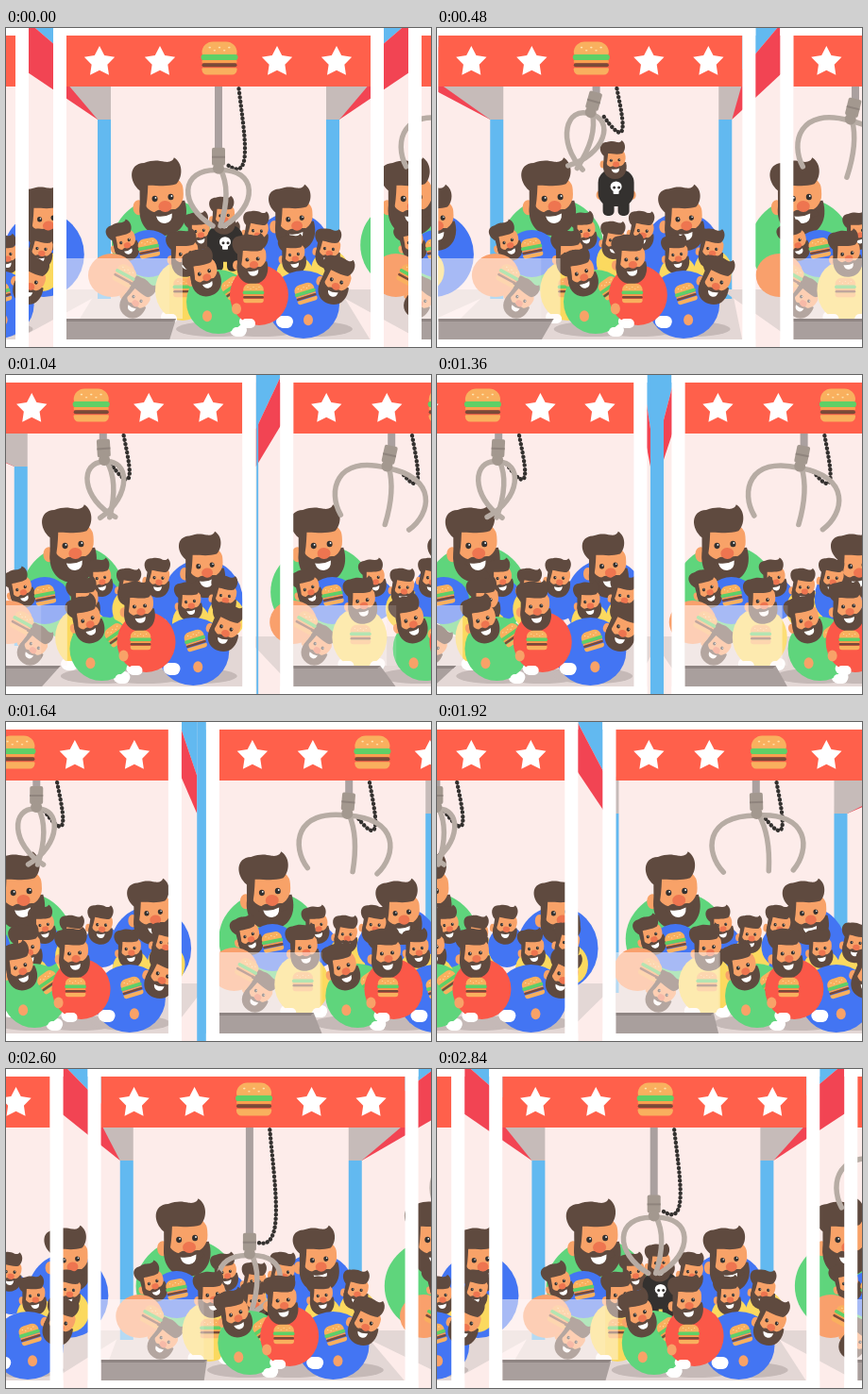
These frames come from a looping animation (450x338 px, 2.88 s). An HTML page with a canvas:

```html
<!DOCTYPE html>
<html lang="en">
<head>
<meta charset="utf-8">
<title>Claw machines</title>
<style>
html, body { margin: 0; width: 100%; height: 100%; overflow: hidden; background: #fdecea; }
canvas { display: block; width: 450px; height: 338px; }
</style>
</head>
<body>
<canvas width="450" height="338"></canvas>
<script>
const ctx = document.querySelector('canvas').getContext('2d');
const LOOP = 2880, STEP = 40, PITCH = 376, MID = 225;
const C = {
  pink: '#fdecea', white: '#fff', banner: '#ff604b', red: '#fb5848', beam: '#f24453', sky: '#62b9f0',
  green: '#5fd57c', blue: '#4375f3', yellow: '#fbd95f', peach: '#f9a06c', black: '#34312f',
  skin: '#f8a268', nose: '#ee7550', hair: '#5f4a3f', steel: '#b7aca4', ceiling: '#c6bbb9',
  floor: '#e3d7d5', pit: '#a99f9d', bun: '#f9b05e'
};

// layer, depth, eye x, eye y, size, tilt, colour, body ellipse relative to the eyes, extras
const SMALL = [1, 23, 20, 22];
const CROWD = [
  ['back', .7, 166, 180, 1, -.05, 'green', [0, 50, 54, 50]],
  ['back', .7, 306, 202, .85, -.05, 'blue', [-3, 38, 43, 45]],
  ['mid', .77, 205, 215, .5, -.1, 'blue', SMALL],
  ['mid', .77, 236, 225, .5, .1, 'yellow', SMALL],
  ['mid', .77, 266, 215, .52, .12, 'blue', SMALL],
  ['mid', .81, 342, 234, .53, .15, 'yellow', SMALL],
  ['mid', .81, 305, 240, .52, -.05, 'yellow', SMALL],
  ['low', .81, 126, 226, .53, -.3, 'blue', [25, 13, 27, 25], { snack: [25, 7, -.2] }],
  ['low', .8, 139, 287, .55, .6, 'peach', [-27, -25, 25, 23], { snack: [-13, -25, .5] }],
  ['low', .78, 190, 239, .62, -.08, 'yellow', [-3, 39, 29, 32], { snack: [-2, 36, 0], shoes: [-17, 15] }],
  ['front', .91, 210, 259, .64, -.25, 'green', [15, 31, 34, 34], { snack: [30, 16, -.6], shoes: [36], hand: 3 }],
  ['front', .86, 350, 268, .64, .35, 'blue', [-35, 25, 38, 36], { snack: [-33, 13, -.3], hand: -30 }],
  ['front', .88, 261, 245, .66, -.03, 'red', [7, 38, 31, 32], { snack: [1, 36, 0], shoes: [-5, 34], hand: -17 }]
];

const shift = (c, depth) => (c - MID) * depth;

function key(t, frames) {
  if (t <= frames[0][0]) return frames[0][1];
  for (let i = 1; i < frames.length; i++) {
    const [t0, a] = frames[i - 1], [t1, b] = frames[i];
    if (t <= t1) return a + (b - a) * (t - t0) / (t1 - t0);
  }
  return frames[frames.length - 1][1];
}
function rect(x, y, w, h, color) {
  ctx.fillStyle = color;
  ctx.fillRect(x, y, w, h);
}
function poly(color, ...points) {
  ctx.fillStyle = color;
  ctx.beginPath();
  points.forEach(p => ctx.lineTo(p[0], p[1]));
  ctx.fill();
}
function oval(x, y, rx, ry, color) {
  ctx.fillStyle = color;
  ctx.beginPath();
  ctx.ellipse(x, y, rx, ry, 0, 0, Math.PI * 2);
  ctx.fill();
}
function box(x, y, w, h, r, color) {
  ctx.fillStyle = color;
  ctx.beginPath();
  ctx.roundRect(x, y, w, h, r);
  ctx.fill();
}
function path(d, color) {
  ctx.fillStyle = color;
  ctx.fill(new Path2D(d));
}
function at(x, y, angle, size, draw) {
  ctx.save();
  ctx.translate(x, y);
  ctx.rotate(angle);
  ctx.scale(size, size);
  draw();
  ctx.restore();
}
function within(x, w, draw) {
  ctx.save();
  ctx.beginPath();
  ctx.rect(x, 0, w, 338);
  ctx.clip();
  draw();
  ctx.restore();
}

function burger() {
  box(-18, -17, 36, 14, [12, 12, 3, 3], C.bun);
  for (let i = 0; i < 5; i++) oval(-10 + i * 5, -11 + (i % 2) * 3, 1.2, .8, '#fde3ae');
  box(-19, -4, 38, 6, 3, '#5fd066');
  box(-18, 2, 36, 3, 1, '#f9a04f');
  box(-18, 5, 36, 4, 2, '#7a4a38');
  box(-18, 10, 36, 7, [1, 1, 5, 5], C.bun);
}
function star(x, y) {
  const points = Array.from({ length: 10 }, (_, i) => {
    const r = i % 2 ? 8.8 : 17, a = i * Math.PI / 5 - Math.PI / 2;
    return [x + r * Math.cos(a), y + r * Math.sin(a)];
  });
  poly(C.white, ...points);
}
// The origin lies between the eyes.
function head() {
  oval(-26, 9, 6, 8, C.skin);
  path('M-24 4 L23 4 C28 24 18 40 0 40 C-19 40 -29 24 -24 4Z', C.hair);
  box(-20, -22, 42, 37, [10, 14, 18, 14], C.skin);
  path('M-25 14 L-24 -9 C-35 -19 -35 -38 -18 -38 C-8 -41 -3 -40 4 -38 C10 -37 13 -39 14 -42 C24 -35 22 -20 15 -14 C4 -11 -7 -14 -15 -14 C-16 -3 -17 6 -20 16Z', C.hair);
  path('M-13 20 C-10 11 -2 12 3 14 C9 11 17 12 18 19 C10 23 -4 24 -13 20Z', C.hair);
  for (const x of [-8.5, 8.5]) {
    oval(x, -x * .06, 3, 3.2, C.black);
    oval(x + 1, -x * .06 - 1, .9, .9, C.white);
  }
  oval(2, 9, 7, 6, C.nose);
  path('M-8 19 Q1 21 9 17 Q9 27 1 27 Q-6 27 -8 19Z', C.white);
}
function crowd(layer, c) {
  for (const [l, depth, x, y, size, tilt, color, [bx, by, rx, ry], extra = {}] of CROWD) {
    if (l !== layer) continue;
    at(x + shift(c, depth), y, 0, 1, () => {
      const foot = by + ry - 4;
      (extra.shoes || []).forEach(dx => box(dx - 9, foot - 6, 18, 12, 6, C.white));
      oval(bx, by, rx, ry, C[color]);
      (extra.shoes || []).forEach(dx => box(dx - 7, foot - 3, 15, 10, 5, C.white));
      if (extra.hand) oval(extra.hand, by + ry * .45, 5, 6, C.skin);
      at(0, 0, tilt, size, head);
      if (extra.snack) at(extra.snack[0], extra.snack[1], extra.snack[2], .6, burger);
    });
  }
}

const hubY = t => key(t, [[-960, 93], [-520, 197], [-300, 195], [350, 86]]);

function skullMan(c, t) {
  if (t < -300 || t > 900) return;
  const fall = Math.max(0, t - 480);
  const y = Math.min(hubY(t) + 81 + .0009 * fall * fall, 282);
  const x = MID + shift(c, .9) + key(t, [[0, 7], [480, 21], [800, 12]]);
  for (const side of [-1, 1]) {
    box(x + side * 8 - 6, y + 13, 12, 19, 5, C.black);
    oval(x + side * 17, y + 10, 4, 5, C.skin);
  }
  box(x - 19, y - 17, 38, 39, 14, C.black);
  at(x - 1, y - 27, 0, .5, head);
  oval(x, y + 1, 6, 5.5, C.white);
  box(x - 3, y + 3, 6, 6, 1, C.white);
  oval(x - 2, y + 2, 1.5, 1.5, C.black);
  oval(x + 3, y + 2, 1.5, 1.5, C.black);
}
function claw(c, t) {
  const hub = hubY(t);
  const x = MID + shift(c, .9) + key(t, [[-2880, -84], [-2400, -64], [-1840, -33], [-1520, -15], [-960, 0]]);
  const angle = key(t, [[-2400, .24], [-1520, .2], [-960, -.03], [-700, 0], [200, 0], [480, .27],
    [720, -.15], [1040, -.06], [1360, .05], [1700, 0]]);
  const reach = key(t, [[-540, 56], [-320, 42], [350, 42], [480, 27]]);
  const tip = key(t, [[-540, 37], [-320, 6], [350, 6], [480, -8]]);

  ctx.lineCap = 'round';
  ctx.strokeStyle = C.black;
  ctx.lineWidth = 4.4;
  ctx.setLineDash([.1, 4.4]);
  ctx.beginPath();
  ctx.moveTo(x + 21, 60);
  ctx.bezierCurveTo(x + 27, 90 + (hub - 85) * .35, x + 38, hub + 50 - (hub - 85) * .45, x + 8, hub + 8 - (hub - 85) * .15);
  ctx.stroke();
  ctx.setLineDash([]);

  rect(x - 4, 61, 8, Math.max(0, hub - 76), '#aaa09f');
  at(x, hub - 18, angle, 1, () => {
    box(-7, 0, 14, 19, 2, '#a3988f');
    rect(-7, 9, 14, 2, '#8f847d');
    ctx.strokeStyle = C.steel;
    ctx.lineWidth = 5.5;
    for (const side of [-1, 1]) {
      ctx.beginPath();
      ctx.moveTo(0, 24);
      ctx.bezierCurveTo(side * reach, 22, side * reach, 62, side * tip, 83);
      ctx.stroke();
    }
    ctx.beginPath();
    ctx.moveTo(2, 23);
    ctx.quadraticCurveTo(14, 45, key(t, [[-540, 11], [-320, 2]]), 83);
    ctx.stroke();
    oval(0, 22, 6, 6, '#a3988f');
  });
}

function shell(c) {
  const back = MID + shift(c, .65), left = back - 128, right = back + 128;
  const inL = c - 161, inR = c + 161;
  poly(C.floor, [inL, 331], [inR, 331], [right, 277], [left, 277]);

  for (const side of [-1, 1]) {
    const bx = back + side * 128, fx = c + side * (PITCH - 168);
    if (side * (fx - bx) < 0) continue;
    poly(C.sky, [c + side * 175, 0], [fx, -12], [bx, 57], [bx, 0]);
    poly(C.beam, [bx, 57], [bx, 97], [fx, 43], [fx, -12]);
  }
  within(inL, 322, () => {
    rect(left, 97, 14, 190, C.sky);
    rect(right - 14, 97, 14, 190, C.sky);
    if (left > inL - 14) poly(C.ceiling, [inL, 58], [left + 14, 58], [left + 14, 97], [left, 97]);
    if (right < inR + 14) poly(C.ceiling, [inR, 58], [right - 14, 58], [right - 14, 97], [right, 97]);
  });
}
// A back post standing behind the space between two cabinets shows at full height.
function gapPost(c) {
  within(c - 200, 25, () => rect(MID + shift(c, .65) - 128, 0, 14, 338, C.sky));
}
function shadows(c) {
  const dx = shift(c, .9);
  for (const x of [222, 270, 325]) oval(x + dx, 319, 42, 8, '#c5b9b7');
}
function chute(c) {
  const inL = c - 161, front = c - 52, side = 187 + shift(c, .9);
  poly(C.pit, [inL, 308], [side - 7, 308], [front, 331], [inL, 331]);
  poly('#8f8583', [inL, 308], [side - 7, 308], [side - 10, 311], [inL, 311]);
  rect(inL, 244, side - inL, 64, 'rgba(255,246,244,.45)');
  rect(inL, 244, Math.max(0, front - inL), 64, 'rgba(255,246,244,.15)');
}
function facade(c) {
  rect(c - 175, 0, 350, 8, C.white);
  rect(c - 161, 8, 322, 54, C.banner);
  rect(c - 175, 0, 14, 338, C.white);
  rect(c + 161, 0, 14, 338, C.white);
  rect(c - 175, 330, 350, 8, C.white);
  [-126, -62, 62, 125].forEach(x => star(c + x, 36));
  at(c + 1, 32, 0, 1.03, burger);
}

function render(time) {
  const now = Math.floor((time % LOOP) / STEP) * STEP;
  const machines = [-1, 0, 1, 2].map(k => ({ c: MID + PITCH * (k - now / LOOP), t: now - k * LOOP }));
  const each = draw => machines.forEach(m => draw(m.c, m.t));
  const lifted = t => t < 560;

  rect(0, 0, 450, 338, C.pink);
  each(shell);
  each(gapPost);
  each(shadows);
  each(c => crowd('back', c));
  each((c, t) => { if (!lifted(t)) skullMan(c, t); });
  each(c => crowd('mid', c));
  each((c, t) => {
    if (lifted(t)) skullMan(c, t);
    claw(c, t);
  });
  each(c => crowd('low', c));
  each(c => crowd('front', c));
  each(chute);
  each(facade);
}

const start = performance.now();
function tick() {
  render(performance.now() - start);
  requestAnimationFrame(tick);
}
tick();
</script>
</body>
</html>
```
